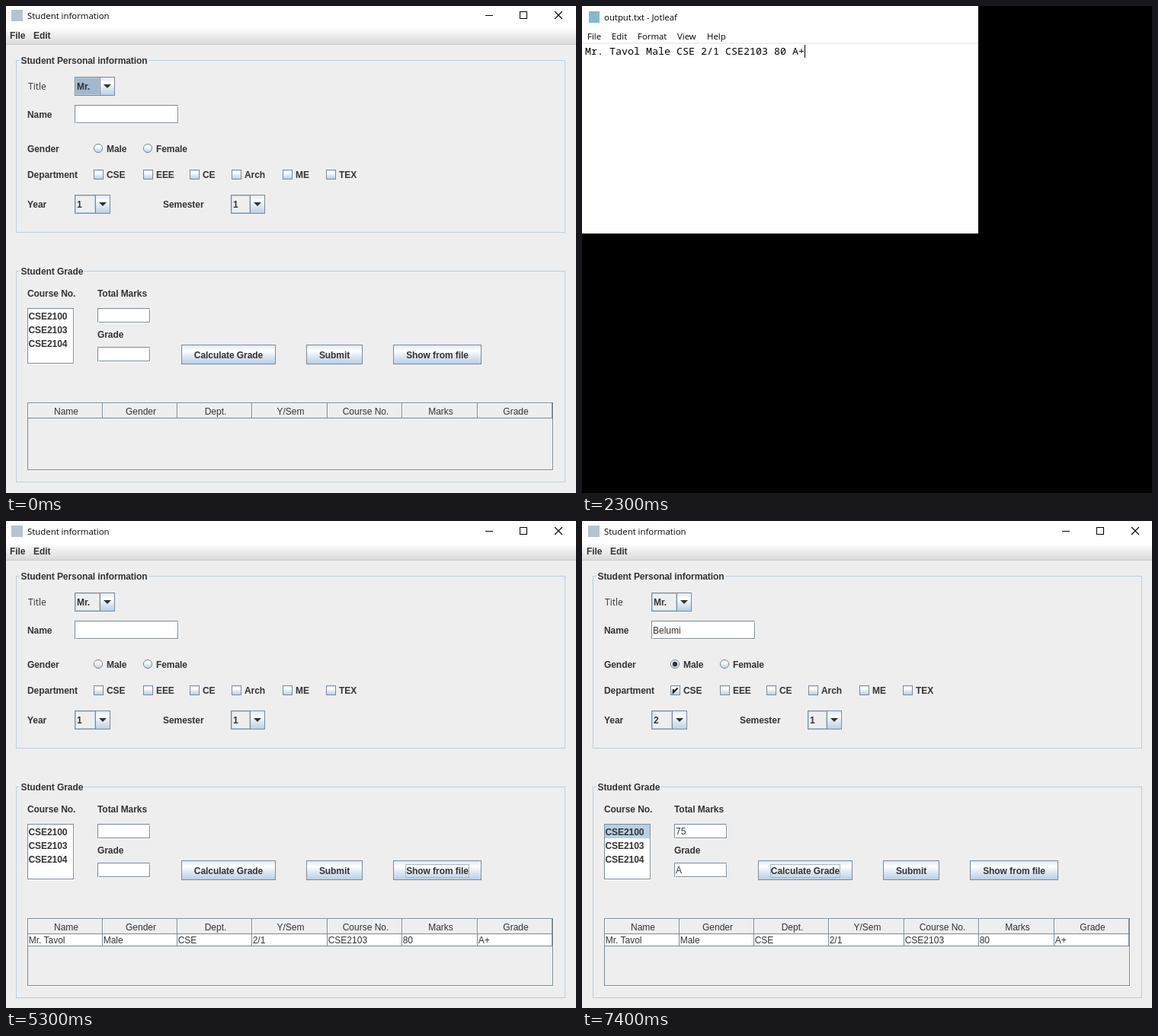
An HTML page for the animation above (8 s loop, 748 by 640 pixels).

```html
<!DOCTYPE html>
<html lang="en">
<head>
<meta charset="utf-8">
<title>Student information</title>
<style>
  html, body { margin: 0; width: 100%; height: 100%; overflow: hidden; background: #000; }
  svg { display: block; width: 748px; height: 640px; }
  text { font: 12px "Liberation Sans", Arial, sans-serif; fill: #333; white-space: pre; }
  .b { font-weight: bold; letter-spacing: -.07px; }
  .m { text-anchor: middle; }
  .ui { font: 11.4px "Open Sans", "Noto Sans", sans-serif; fill: #000; }
  .label { font: 12px "Open Sans", "Noto Sans", sans-serif; }
  .mono { font: 13.333px "Noto Sans Mono", "DejaVu Sans Mono", monospace; fill: #000; }
  rect, .line { shape-rendering: crispEdges; }
  .scene { visibility: hidden; animation: 8s step-end infinite; }
  #empty { animation-name: empty; }
  #editor { animation-name: editor; }
  #loaded { animation-name: loaded; }
  #filled { animation-name: filled; }
  @keyframes empty { 0% { visibility: visible } 6.25%, 100% { visibility: hidden } }
  @keyframes editor { 0% { visibility: hidden } 6.25% { visibility: visible } 43.75%, 100% { visibility: hidden } }
  @keyframes loaded { 0% { visibility: hidden } 43.75% { visibility: visible } 81.25%, 100% { visibility: hidden } }
  @keyframes filled { 0% { visibility: hidden } 81.25%, 100% { visibility: visible } }
</style>
</head>
<body>
<svg id="stage" viewBox="0 0 748 640">
  <defs>
    <linearGradient id="menu" x2="0" y2="1">
      <stop stop-color="#fff"/><stop offset="1" stop-color="#dadada"/>
    </linearGradient>
    <linearGradient id="metal" x2="0" y2="1">
      <stop stop-color="#dde8f3"/><stop offset=".3" stop-color="#fff"/>
      <stop offset=".6" stop-color="#dde8f3"/><stop offset="1" stop-color="#b8cfe5"/>
    </linearGradient>
  </defs>
</svg>
<script>
const EDGE = '#7a8a99', BLUE = '#b8cfe5', FOCUS = '#a3b8cc', PANEL = '#eee', METAL = 'url(#metal)';
const STUDENT = 'Mr. Tavol';

const text = (x, y, s, cls = 'b') => `<text x="${x}" y="${y}" class="${cls}">${s}</text>`;
const rect = (x, y, w, h, fill) => `<rect x="${x}" y="${y}" width="${w}" height="${h}" fill="${fill}"/>`;
const path = (d, color, cls = 'line', width = 1) =>
  `<path class="${cls}" d="${d}" fill="none" stroke="${color}" stroke-width="${width}"/>`;
// Boxes are given by their first and last pixel.
const box = (x, y, x2, y2, fill, edge = EDGE) =>
  `<rect x="${x + .5}" y="${y + .5}" width="${x2 - x}" height="${y2 - y}" fill="${fill}" stroke="${edge}"/>`;
const sunken = (x, y, x2, y2, fill = '#fff') =>
  path(`M${x + 1} ${y2 + 1.5}H${x2 + 1.5}V${y + 1}`, '#fff') + box(x, y, x2, y2, fill);
const field = (x, y, x2, y2, value = '') =>
  sunken(x, y, x2, y2) + rect(x + 1, y2, 1, 1, PANEL) + rect(x2, y + 1, 1, 1, PANEL) +
  text(x + 2, Math.floor((y + y2 + 1) / 2) + 5, value, '');

const group = (y, y2, gap, title) =>
  box(13, y, 733, y2, 'none', BLUE) + rect(18, y - 1, gap - 18, 3, PANEL) + text(19.5, y + 5, title);

const combo = (x, y, sep, x2, value, focus) => {
  const c = (sep + x2) / 2 + .5, t = y + 10;
  return box(x, y, x2, y + 24, PANEL) + box(x + 1, y + 1, sep - 1, y + 23, focus ? FOCUS : PANEL, BLUE) +
    box(sep, y, x2, y + 24, METAL) +
    `<path d="M${c - 5} ${t}h10l-5 5z" fill="#333"/>` + text(x + 3, y + 17, value);
};

const radio = (x, label, on) =>
  `<circle cx="${x}" cy="187" r="5.6" fill="${METAL}" stroke="${EDGE}"/>` +
  (on ? `<circle cx="${x}" cy="187" r="3.2" fill="#333"/>` : '') + text(x + 11, 192, label);

const check = (x, label, on) =>
  box(x, 215, x + 12, 227, METAL) +
  (on ? path(`M${x + 3.8} 220v4.5l5.7-6`, '#222', '', 2) : '') + text(x + 17, 226, label);

// half is half the width of the focus ring, if any.
const button = (x, x2, label, half) => {
  const c = (x + x2 + 1) / 2;
  return box(x, 445, x2, 470, METAL) +
    (half ? box(c - half, 450, c + half - 1, 467, 'none', FOCUS) : '') +
    text(c, 463, label, 'b m');
};

const table = row => {
  const cols = [28, 126, 224, 322, 421, 519, 618, 716];
  const heads = ['Name', 'Gender', 'Dept.', 'Y/Sem', 'Course No.', 'Marks', 'Grade'];
  let out = sunken(28, 521, 717, 609, PANEL);
  if (row) out += rect(29, 542, 688, 15, '#fff') + path('M29 557.5H717', EDGE);
  heads.forEach((name, i) => {
    const x = cols[i], x2 = cols[i + 1];
    out += path(`M${x + 1.5} 541V522.5H${x2}`, '#fff') +
      path(`M${x + 1} 541.5H${x2 + .5}V${row ? 558 : 542}M${x2 + .5} 542V522`, EDGE) +
      text((x + x2) / 2 + 2, 537, name, 'm');
    if (row) out += text(x + 1.7, 554, row[i], '');
  });
  return out;
};

const form = (id, dx, dy, s) => `<g id="${id}" class="scene"><g transform="translate(${dx} ${dy})">` +
  rect(-2, -2, 752, 644, PANEL) + rect(-2, -2, 752, 30, '#fff') + rect(-2, 28, 752, 22, 'url(#menu)') +
  rect(-2, 50, 752, 1, '#ccc') +
  rect(7, 5, 15, 15, '#b4c3d2') + text(28, 17, 'Student information', 'ui') +
  path('M629 12.5H639', '#000') + box(674, 7, 683, 16, 'none', '#000') +
  path('M720 7l10 10m0-10l-10 10', '#000', '', 1.1) +
  text(5, 43, 'File') + text(36, 43, 'Edit') +

  group(71, 297, 187, 'Student Personal information') +
  text(29, 110, 'Title', 'label') + combo(90, 93, 123, 142, 'Mr.', s.focus === 'title') +
  text(28, 147, 'Name') + field(90, 130, 225, 153, s.name) +
  text(28, 192, 'Gender') + radio(121, 'Male', s.done) + radio(186, 'Female') +
  text(28, 226, 'Department') +
  [[115, 'CSE'], [180, 'EEE'], [241, 'CE'], [296, 'Arch'], [363, 'ME'], [420, 'TEX']]
    .map(([x, label], i) => check(x, label, s.done && !i)).join('') +
  text(28, 265, 'Year') + combo(90, 248, 117, 136, s.done ? 2 : 1) +
  text(206, 265, 'Semester') + combo(295, 248, 320, 339, 1) +

  group(348, 625, 102, 'Student Grade') +
  text(28, 382, 'Course No.') + text(120, 382, 'Total Marks') + text(120, 436, 'Grade') +
  sunken(28, 397, 88, 469) + (s.done ? rect(29, 398, 59, 18, BLUE) : '') +
  ['CSE2100', 'CSE2103', 'CSE2104'].map((c, i) => text(29.5, 412 + 18 * i, c)).join('') +
  field(120, 397, 188, 415, s.marks) + field(120, 448, 188, 466, s.grade) +
  button(230, 353, 'Calculate Grade', s.focus === 'calc' && 46) +
  button(394, 467, 'Submit') +
  button(508, 623, 'Show from file', s.focus === 'show' && 42) +
  table(s.row) + '</g></g>';

const editor = () => '<g id="editor" class="scene">' +
  rect(0, 0, 748, 640, '#000') + rect(0, 0, 520, 299, '#fff') +
  rect(9, 7, 14, 15, '#86b9c9') + text(29, 19, 'output.txt - Jotleaf', 'ui') +
  [[7, 'File'], [39, 'Edit'], [73, 'Format'], [125, 'View'], [164, 'Help']]
    .map(([x, label]) => text(x, 44, label, 'ui')).join('') +
  rect(0, 48, 520, 2, '#f0f0f0') +
  text(4, 64, STUDENT + ' Male CSE 2/1 CSE2103 80 A+', 'mono') + rect(292, 51, 1, 17, '#000') + '</g>';

const row = [STUDENT, 'Male', 'CSE', '2/1', 'CSE2103', '80', 'A+'];
document.getElementById('stage').insertAdjacentHTML('beforeend',
  form('empty', 0, 0, { focus: 'title' }) +
  editor() +
  form('loaded', 0, 1, { focus: 'show', row }) +
  form('filled', 1, 1, { focus: 'calc', row, done: true, name: 'Belumi', marks: '75', grade: 'A' }));
</script>
</body>
</html>
```
